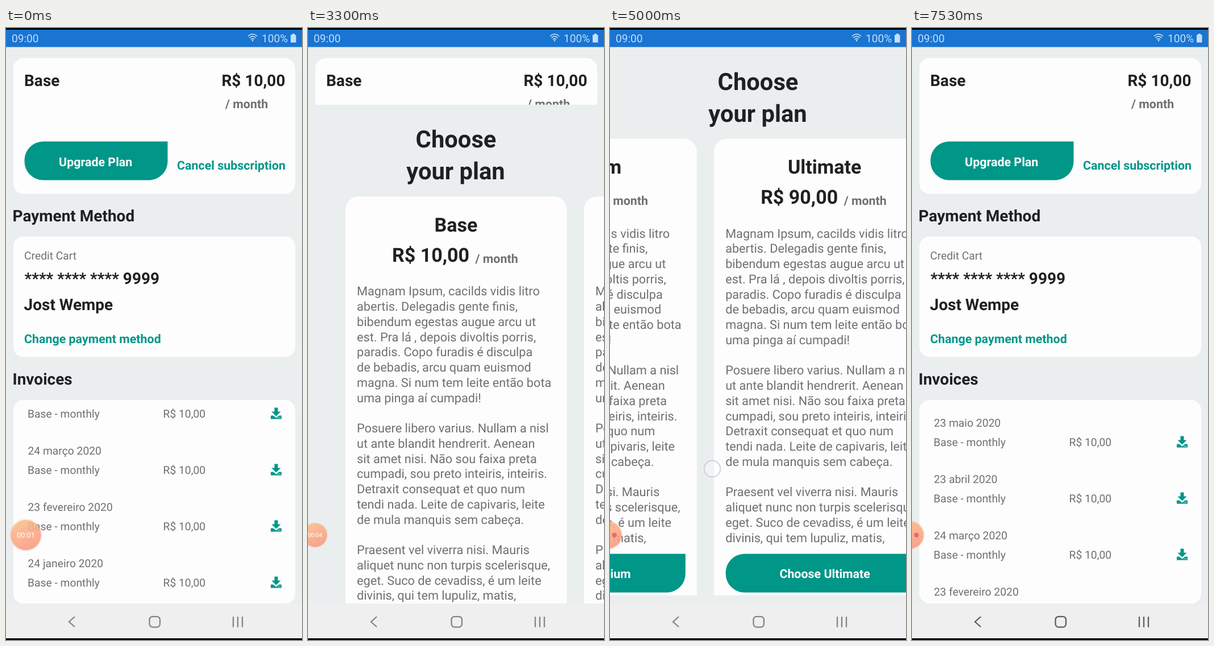
Write an HTML page that moves like this. It is 521 px wide and 1076 px high and loops after 7560 ms.

```html
<!DOCTYPE html>
<html lang="en">
<head>
<meta charset="utf-8">
<title>Subscription plans</title>
<style>
  html, body { margin: 0; width: 100%; height: 100%; overflow: hidden; background: #ebeeee; }
  svg { display: block; width: 521px; height: 1076px; font-family: Roboto, sans-serif; text-rendering: geometricPrecision; }
  .bold { font-weight: 700; fill: #1f2022; }
  .h { font-size: 28px; }
  .title { font-size: 41.7px; text-anchor: middle; }
  .plan { font-size: 34px; }
  .mid { text-anchor: middle; }
  .end { text-anchor: end; }
  .small { font-size: 21.4px; font-weight: 700; }
  .gray { fill: #707070; }
  .teal { fill: #009688; }
  .white { fill: #fff; }
  .info { font-size: 19.3px; fill: #707070; }
  .body { font-size: 21.7px; fill: #707070; }
  .status { font-size: 19.1px; fill: #c3e0fa; }
  .card { fill: #fdfdfd; }
  .page { fill: #ebeeee; }
</style>
</head>
<body>
<svg viewBox="0 0 521 1076">
  <defs>
    <clipPath id="screen"><rect y="33" width="521" height="979"/></clipPath>
    <clipPath id="listClip"><rect x="13" y="654" width="496" height="358" rx="18"/></clipPath>
    <clipPath id="deckClip"><rect y="185" width="521" height="812.5"/></clipPath>
    <linearGradient id="peach" x1="0" y1="0" x2="0.5" y2="1">
      <stop offset="0" stop-color="#fbc38c"/><stop offset="1" stop-color="#f99b82"/>
    </linearGradient>
    <g id="download" class="teal">
      <path d="M-3-10h6v7h5L0 5-8-3h5z"/>
      <path d="M-9.5 4h4.5l5 4 5-4h4.5v6h-19z"/>
      <path d="M3 7.6h1.6M6 7.6h1.6" stroke="#fdfdfd" stroke-width="1.4"/>
    </g>
  </defs>

  <rect class="page" width="521" height="1076"/>
  <g clip-path="url(#screen)">
    <rect class="card" x="13" y="53" width="496" height="238.500" rx="18"/>
    <text class="bold h" x="32" y="102">Base</text>
    <text class="bold h end" x="491.500" y="102">R$ 10,00</text>
    <text class="small gray" x="386" y="140.500">/ month</text>
    <g id="upgrade">
      <path class="teal" d="M65.500 199.500H284.500V234.500A33 33 0 0 1 251.500 267.500H65.500A33 33 0 0 1 32.500 234.500V232.500A33 33 0 0 1 65.500 199.500Z"/>
      <text class="small white mid" x="157.700" y="242.500">Upgrade Plan</text>
    </g>
    <text class="small teal end" x="492" y="248.500">Cancel subscription</text>

    <text class="bold h" x="11.500" y="340">Payment Method</text>
    <rect class="card" x="13" y="366.500" width="496" height="212" rx="18"/>
    <text class="info" x="32" y="407">Credit Cart</text>
    <text class="bold h" x="32.500" y="450">**** **** **** 9999</text>
    <text class="bold h" x="31.500" y="495.500">Jost Wempe</text>
    <text class="small teal" x="32" y="553.500">Change payment method</text>

    <text class="bold h" x="11.500" y="627">Invoices</text>
    <rect class="card" x="13" y="654" width="496" height="358" rx="18"/>
    <g clip-path="url(#listClip)">
      <g id="list"></g>
      <path id="glow" d="M13 654H509V661Q261 677 13 661Z" fill="#dcecfc"/>
    </g>

    <g id="modal">
      <rect class="page" y="33" width="521" height="979"/>
      <text class="bold title" x="260.500" y="108.500">Choose</text>
      <text class="bold title" x="260" y="164.500">your plan</text>
      <g clip-path="url(#deckClip)"><g id="deck"></g></g>
    </g>
  </g>

  <rect width="521" height="3"/>
  <rect y="3" width="521" height="30.500" fill="#1a74d2"/>
  <text class="status" x="10" y="25">09:00</text>
  <text class="status" x="450" y="25">100%</text>
  <g fill="none" stroke="#c3e0fa" stroke-width="1.600">
    <path d="M426 14.500Q434 7 442 14.500M428.500 17.300Q434 12 439.500 17.300M431 20Q434 17.300 437 20"/>
  </g>
  <circle cx="434" cy="22" r="1.400" fill="#c3e0fa"/>
  <path d="M503.500 10h4.500v2h2.500v13.500h-9.500v-13.500h2.500z" fill="#c3e0fa"/>

  <rect y="1012" width="521" height="62" fill="#efefef"/>
  <g id="nav" fill="none" stroke-width="2.300">
    <path d="M121 1035L111 1044L121 1053"/>
    <rect x="252.500" y="1034.800" width="18.500" height="18.500" rx="5.500"/>
    <path d="M400 1035V1053.500M408 1035V1053.500M416 1035V1053.500"/>
  </g>
  <rect y="1073" width="521" height="3"/>

  <g id="bubble">
    <circle r="28.500" fill="#f3a987" opacity="0.25"/>
    <circle r="26.500" fill="url(#peach)" opacity="0.85"/>
    <text id="timer" class="white mid" y="4.500" font-size="12.800"></text>
    <circle id="dot" cx="12.500" r="4.700" fill="#f7636b"/>
  </g>
  <circle id="touch" r="14.300" fill="#fff" fill-opacity="0.35" stroke="#c3c7de" stroke-width="1.700"/>
</svg>
<script>
const LOOP = 7560, PITCH = 419.8;
const $ = id => document.getElementById(id);
const text = (cls, x, y, s) => `<text class="${cls}" x="${x}" y="${y}">${s}</text>`;

const dates = ['23 maio', '23 abril', '24 março', '23 fevereiro', '24 janeiro'];
$('list').innerHTML = dates.map((d, i) => {
  const y = 701 + i * 99;
  return text('info', 38.5, y, d + ' 2020') + text('info', 38, y + 34, 'Base - monthly') +
    text('info', 276.5, y + 34, 'R$ 10,00') + `<use href="#download" x="475.5" y="${y + 26.5}"/>`;
}).join('');

const copy = `Magnam Ipsum, cacilds vidis litro
abertis. Delegadis gente finis,
bibendum egestas augue arcu ut
est. Pra lá , depois divoltis porris,
paradis. Copo furadis é disculpa
de bebadis, arcu quam euismod
magna. Si num tem leite então bota
uma pinga aí cumpadi!

Posuere libero varius. Nullam a nisl
ut ante blandit hendrerit. Aenean
sit amet nisi. Não sou faixa preta
cumpadi, sou preto inteiris, inteiris.
Detraxit consequat et quo num
tendi nada. Leite de capivaris, leite
de mula manquis sem cabeça.

Praesent vel viverra nisi. Mauris
aliquet nunc non turpis scelerisque,
eget. Suco de cevadiss, é um leite
divinis, qui tem lupuliz, matis,`.split('\n');
const plans = [['Base', 10], ['Medium', 30], ['Ultimate', 90]];
$('deck').innerHTML = plans.map(([name, price], i) =>
  `<g transform="translate(${66 + i * PITCH})">
    <rect class="card" y="194.5" width="389.5" height="850" rx="23"/>` +
    text('bold plan mid', 194.5, 256, name) +
    text('bold plan', 82, 309, `R$ ${price},00`) +
    text('small gray', 228.5, 311, '/ month') +
    copy.map((s, n) => text('body', 20, 368.5 + n * 26.75, s)).join('') +
    `<path class="teal" d="M53.5 924.5H369.5V959.500A33 33 0 0 1 336.5 992.500H53.5A33 33 0 0 1 20.500 959.500V957.500A33 33 0 0 1 53.500 924.500Z"/>` +
    text('small white mid', 195, 967, 'Choose ' + name) + '</g>').join('');

const lin = k => k;
const quadIn = k => k * k;
const quadOut = k => 1 - (1 - k) ** 2;
const cubicOut = k => 1 - (1 - k) ** 3;
const soft = k => k * k * (3 - 2 * k);
const push = k => k ** 1.4;

// Steps are [time, value, easing used to reach it].
function track(t, steps) {
  let [t0, v0] = steps[0];
  if (t <= t0) return v0;
  for (const [t1, v1, ease = lin] of steps.slice(1)) {
    if (t < t1) return v0 + (v1 - v0) * ease((t - t0) / (t1 - t0));
    [t0, v0] = [t1, v1];
  }
  return v0;
}

const scroll = [[900, 149], [1340, 0, soft]];
const glow = [[1310, 0], [1400, 1], [1440, 0.8], [1700, 0]];
const press = [[2200, 1], [2350, 0.35], [2450, 0.35], [2700, 1]];
const sheet = [[3030, 979], [3430, 0, quadOut], [6950, 0], [7350, 979, quadIn]];
const swipe = [[3720, 0], [4080, 235, push], [4480, 420, cubicOut],
  [4560, 420], [4990, 712, push], [5370, 840, cubicOut],
  [5590, 840], [5890, 525, push], [6310, 420, cubicOut]];
const dock = [[300, 35], [650, 12.5, soft], [3780, 12.5], [4050, -3.5, soft]];
const size = [[300, 1], [650, 0.79, soft], [3780, 0.79], [4050, 0.9, soft]];

// Each gesture: start, release, from x, y, to x, y.
const touches = [
  [880, 1440, 340, 622, 348, 807, soft],
  [2200, 2400, 215, 240, 215, 240, lin],
  [3700, 4080, 440, 762, 190, 775, push],
  [4530, 4990, 480, 762, 180, 775, push],
  [5570, 5890, 90, 785, 410, 797, push]
];

function drawTouch(t) {
  const g = touches.find(([a, b]) => t >= a && t < b + 110);
  const el = $('touch');
  el.setAttribute('opacity', g ? Math.min(1, 1 - (t - g[1]) / 110) : 0);
  if (!g) return;
  const [a, b, x0, y0, x1, y1, ease] = g;
  const k = ease(Math.min(1, (t - a) / (b - a)));
  el.setAttribute('cx', x0 + (x1 - x0) * k);
  el.setAttribute('cy', y0 + (y1 - y0) * k);
}

const move = (id, x, y, extra = '') => $(id).setAttribute('transform', `translate(${x} ${y})${extra}`);

function draw(t) {
  move('list', 0, -track(t, scroll));
  move('modal', 0, track(t, sheet));
  move('deck', -track(t, swipe) * PITCH / 420, 0);
  move('bubble', track(t, dock), 891.5, ` scale(${track(t, size)})`);
  $('glow').setAttribute('opacity', track(t, glow));
  $('upgrade').setAttribute('opacity', track(t, press));
  $('nav').setAttribute('stroke', t < 6800 ? '#858585' : '#5e5e5e');
  const docked = t >= 3800;
  $('timer').textContent = docked ? '' : '00:0' + (1 + Math.floor(Math.max(0, t - 200) / 1000));
  $('dot').setAttribute('opacity', docked ? 1 : 0);
  drawTouch(t);
}

const start = performance.now();
function tick(now) {
  draw(Math.max(0, now - start) % LOOP);
  requestAnimationFrame(tick);
}
draw(0);
requestAnimationFrame(tick);
</script>
</body>
</html>
```
